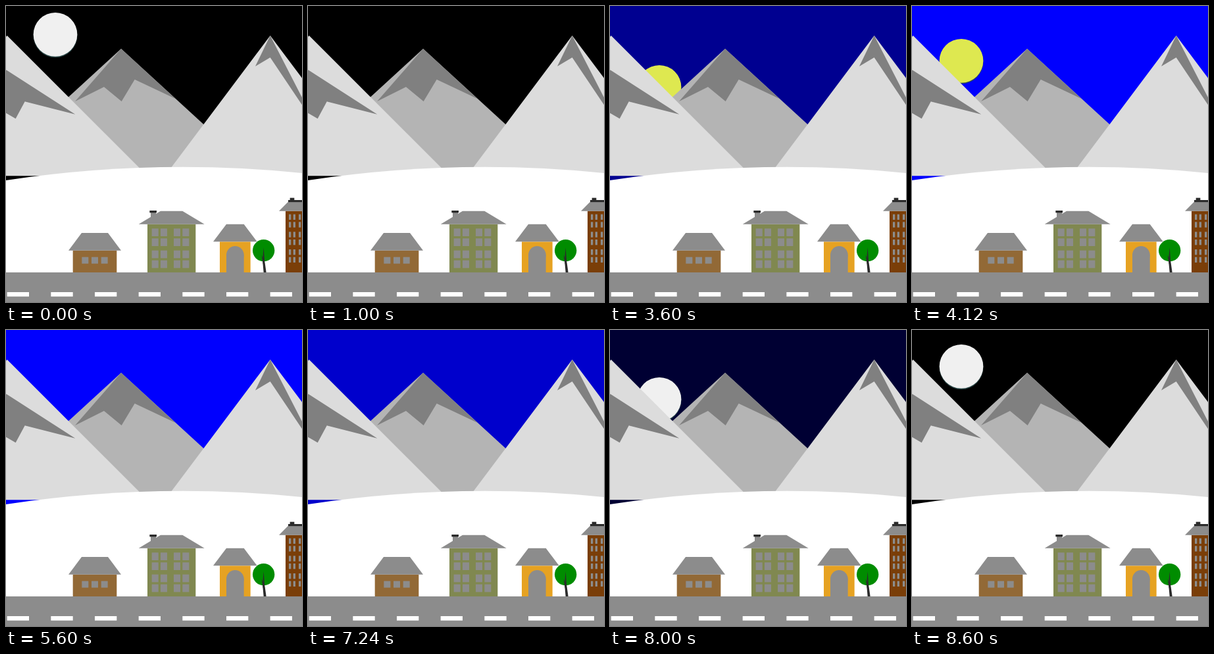
Animation of 450 by 450 pixels, one loop 8.72 s. Source, as an HTML page with a canvas:

```html
<!DOCTYPE html>
<html lang="en">
<head>
<meta charset="utf-8">
<title>Mountain village, day and night</title>
<style>
html, body { margin: 0; width: 100%; height: 100%; overflow: hidden; background: #fff; }
canvas { display: block; }
</style>
</head>
<body>
<canvas id="stage" width="450" height="450"></canvas>
<script>
const ctx = document.getElementById('stage').getContext('2d');
const LOOP = 8720;
const SIZE = 675; // scene units across the stage
const GROUND = 607.5;
const GREY = '#8c8c8c';
const DARK = '#808080';
const SNOW = '#dcdcdc';
const INK = '#2b2b2b';

// Steps taken since start: one per 3.1 ticks of 40 ms
function steps(t, start) {
  const tick = Math.floor((t - start) / 40);
  return Math.max(0, Math.ceil((tick + 0.5) / 3.1));
}

function rect(color, x, y, w, h) {
  ctx.fillStyle = color;
  ctx.fillRect(x, y, w, h);
}

// Points are x, y pairs relative to (x, y)
function poly(color, x, y, ...pts) {
  ctx.fillStyle = color;
  ctx.beginPath();
  for (let i = 0; i < pts.length; i += 2) ctx.lineTo(x + pts[i], y + pts[i + 1]);
  ctx.fill();
}

function disc(color, x, y, r) {
  ctx.fillStyle = color;
  ctx.beginPath();
  ctx.arc(x, y, r, 0, Math.PI * 2);
  ctx.fill();
}

function orb(color, top) {
  ctx.save();
  ctx.shadowColor = '#2f4f4f';
  ctx.shadowOffsetY = 1.5;
  ctx.shadowBlur = 1;
  disc(color, 112.5, top + 50, 50);
  ctx.restore();
}

function drawSky(t) {
  const day = steps(t, 3120);
  const night = steps(t, 7120);
  const blue = night ? 255 * (1 - night / 10) : day && 4 + 28 * day;
  rect(`rgb(0,0,${Math.round(Math.min(254, Math.max(0, blue)))})`, 0, 0, SIZE, 400);
  if (night) orb('#f0f0f0', 228 - 15 * night);
  else if (day) orb('#dee850', 210 - 15 * day);
  else orb('#f0f0f0', 15 - 15 * steps(t, 120));
}

function peak(color, x, y, halfWidth, height) {
  poly(color, x, y, 0, 0, halfWidth, height, -halfWidth, height);
}

function drawMountains() {
  peak('#b4b4b4', 262.5, 97.5, 300, 275);
  poly(DARK, 262.5, 97.5, 0, 0, 124, 114, 31, 70, 1, 120, -39, 87, -105, 120);
  peak(SNOW, 2.5, 67.5, 320, 320);
  poly(DARK, 0, 147, 0, -1, 2.5, 0, 158, 100, 43, 71, 22, 110, 0, 97);
  peak(SNOW, 602.5, 67.5, 240, 320);
  poly(DARK, 602.5, 67.5, 0, 0, 72.5, 141, 72.5, 158, 0, 50, -34, 70);

  ctx.fillStyle = '#fff';
  ctx.beginPath();
  ctx.moveTo(0, 397.5);
  ctx.quadraticCurveTo(SIZE / 2, 346.8, SIZE, 381);
  ctx.lineTo(SIZE, GROUND);
  ctx.lineTo(0, GROUND);
  ctx.fill();
}

function drawRoad() {
  rect(GREY, 0, GROUND, SIZE, SIZE - GROUND);
  for (let x = 2.5; x < SIZE; x += 100) rect('#fff', x, 652.5, 50, 10);
}

function house(color, x, width, height, roofWidth, roofHeight, inset) {
  const top = GROUND - height;
  const half = roofWidth / 2;
  rect(color, x - width / 2, top, width, height);
  poly(GREY, x, top, -half, 0, inset - half, -roofHeight, half - inset, -roofHeight, half, 0);
}

// Windows in blocks of two by two
function panes(x, y, w, h, dx, dy, blockX, blockY, rows) {
  for (let col = 0; col < 4; col++) {
    for (let row = 0; row < rows; row++) {
      const px = x + (col >> 1) * blockX + (col % 2) * dx;
      const py = y + (row >> 1) * blockY + (row % 2) * dy;
      rect(GREY, px, py, w, h);
    }
  }
}

function drawHouses() {
  house('#926936', 202.5, 100, 50, 120, 40, 30);
  for (let i = -1; i <= 1; i++) rect(GREY, 195 + 22 * i, 572.5, 15, 15);

  rect(GREY, 330, 470, 12, 20);
  house('#808850', 377.5, 110, 110, 150, 30, 50);
  rect(INK, 327.5, 466.5, 16, 5);
  panes(332.5, 507.5, 15, 17.5, 20, 22.5, 50, 50, 4);

  house('#e6a222', 522.5, 70, 70, 100, 40, 30);
  disc(GREY, 522.5, 567.5, 20);
  rect(GREY, 502.5, 567.5, 40, 40);

  house('#7a3e08', 692.5, 110, 140, 140, 20, 20);
  rect(INK, 643.5, 442.5, 50, 5);
  rect(INK, 647.5, 437.5, 10, 5);
  panes(645, 475, 5, 12.5, 10, 17.5, 22.5, 40, 6);
}

function drawTree() {
  disc('#008c00', 587.5, 557.5, 25);
  poly(INK, 587.5, GROUND, 0, 0, -2.5, -28, 0, -57, 2, -28, 6, 0);
  poly(INK, 587.5, GROUND, -5, -40, 1, -26, -1, -18);
}

function draw(t) {
  ctx.setTransform(450 / SIZE, 0, 0, 450 / SIZE, 0, 0);
  drawSky(t % LOOP);
  drawMountains();
  drawRoad();
  drawHouses();
  drawTree();
}

const start = performance.now();
function tick() {
  draw(performance.now() - start);
  requestAnimationFrame(tick);
}
tick();
</script>
</body>
</html>
```
